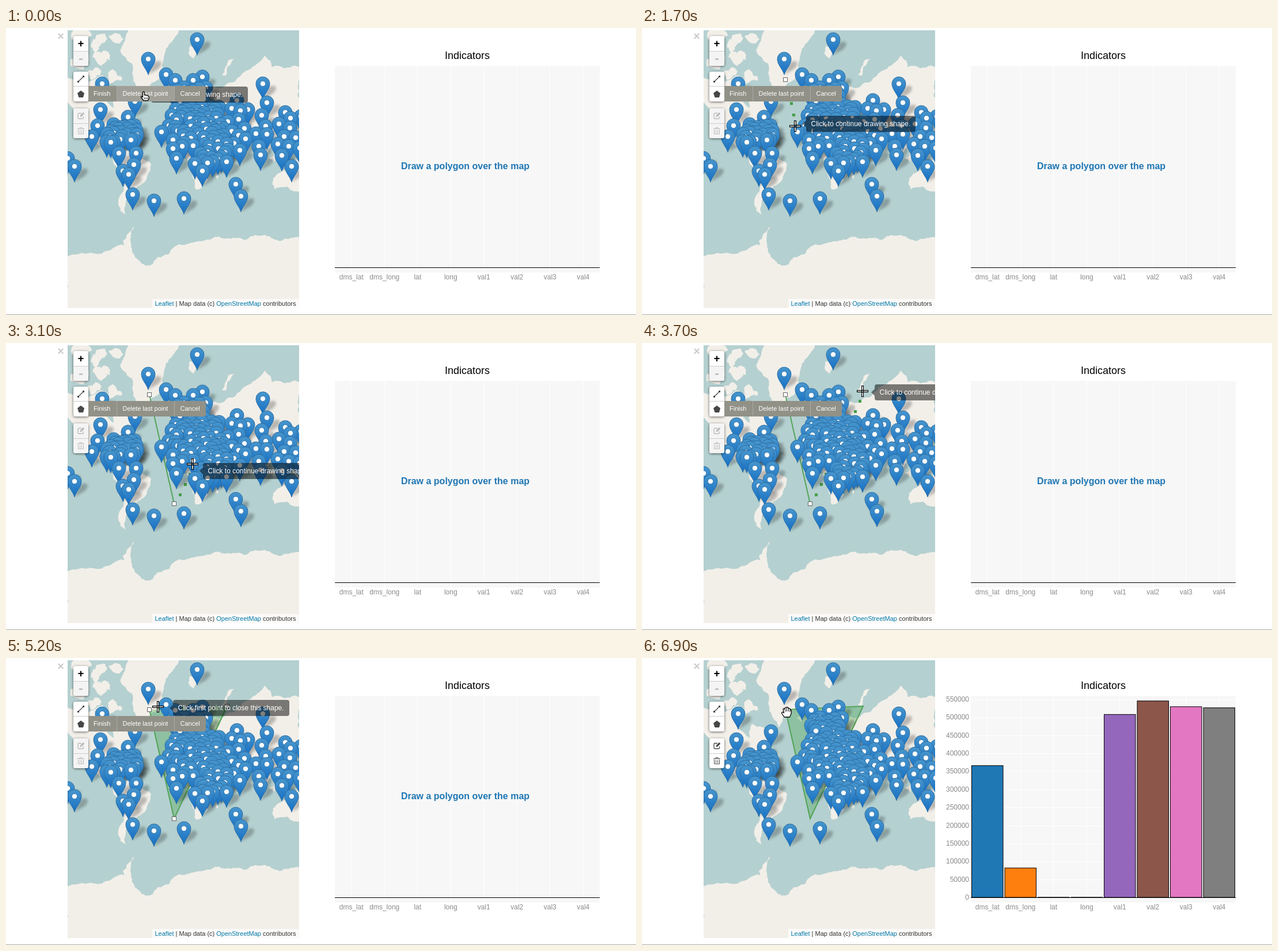
An HTML page that plays this animation: 1094x500 px, repeating every 8 s.

```html
<!DOCTYPE html>
<html lang="en">
<head>
<meta charset="utf-8">
<title>Map indicators</title>
<style>
  html, body { margin: 0; width: 100%; height: 100%; overflow: hidden; background: #fff; }
  svg { display: block; width: 1094px; height: 500px; }
  text { font-family: "Liberation Sans", Arial, Helvetica, sans-serif; white-space: pre; }
</style>
</head>
<body>
<svg viewBox="0 0 1094 500">
  <defs>
    <clipPath id="mapClip"><rect x="107" y="4" width="402" height="484"/></clipPath>
    <linearGradient id="pinFill" x1="0" y1="0" x2="0" y2="1">
      <stop offset="0" stop-color="#4896cd"/><stop offset="1" stop-color="#156fc4"/>
    </linearGradient>
    <filter id="blur" x="-20%" y="-20%" width="140%" height="140%"><feGaussianBlur stdDeviation="2.2"/></filter>
    <filter id="drop" x="-40%" y="-40%" width="180%" height="180%">
      <feDropShadow dx="0" dy="1" stdDeviation="2.2" flood-opacity=".6"/>
    </filter>
    <g id="pin">
      <path d="M0 27.3C-2.5 18-12 10-12 0A12 12 0 0 1 12 0C12 10 2.5 18 0 27.3Z" fill="url(#pinFill)" stroke="#2c6ea3"/>
      <circle r="4.6" fill="#fff" stroke="#3577ab" stroke-width=".8"/>
    </g>
    <path id="shade" d="M0 27L8 9Q15 1 22 5Q25 11 16 18Z" fill-opacity=".24"/>
    <g id="cross" stroke-linecap="square">
      <path d="M-8 0H-3M3 0H8M0-8V-3M0 3V8" stroke="#000" stroke-width="4"/>
      <path d="M-8 0H-3M3 0H8M0-8V-3M0 3V8" stroke="#fff" stroke-width="1.7"/>
    </g>
    <g id="point" fill="#fff" stroke="#000" stroke-width="1.3" stroke-linejoin="round">
      <path d="M-1.5 7V-1Q0-3.5 1.5-1V4Q3 3 4 4.5Q6 3.5 6.500 5Q9 4.500 9 7V10L7.500 13.500H0L-4.500 7.500Q-4.500 5-1.500 7.500Z"/>
      <path d="M1.500 8v3M4 8v3M6.400 8v3" fill="none" stroke-width=".9"/>
    </g>
    <g id="grab" fill="#fff" stroke="#000" stroke-width="1.3" stroke-linejoin="round">
      <path d="M-4 9L-8.500 2Q-8.500-1-4.500 1.500L-6-4.500Q-5-7.500-3-5Q-2.500-9.500 0-7.500Q2.500-9.500 3.500-6Q6-7 6.500-4Q8.500-4 8.500-1Q8.500 4 5.500 9Z"/>
      <path d="M-3-5l1.500 4.500M.3-7.500l.4 6.500M3.500-6v5M6.500-4l-.6 4" fill="none" stroke-width="1"/>
    </g>
  </defs>
  <g clip-path="url(#mapClip)">
    <rect x="107" y="4" width="402" height="484" fill="#b5d0d0"/>
    <path id="land" fill="#f2efe9"/>
    <g id="shape"></g>
    <g id="pins"></g>
    <g id="over"></g>
  </g>
  <g id="credit"></g>
  <g id="controls"></g>
  <g id="chart"></g>
  <g id="cursor"></g>
</svg>
<script>
const LOOP = 8000, STEP = 100, DONE = 6400;
const $ = id => document.getElementById(id);
const rect = (x, y, w, h, fill, more = '') => `<rect x="${x}" y="${y}" width="${w}" height="${h}" fill="${fill}" ${more}/>`;
const path = (d, more) => `<path d="${d}" ${more}/>`;
const text = (x, y, size, fill, s, more = '') => `<text x="${x}" y="${y}" font-size="${size}" fill="${fill}" ${more}>${s}</text>`;
const use = (id, x, y) => `<use href="#${id}" x="${x}" y="${y}"/>`;
const clamp = v => Math.max(0, Math.min(1, v));
const ease = p => p < .5 ? 4 * p ** 3 : 1 - 4 * (1 - p) ** 3;
const pairs = s => s.trim().split(/\s+/).map(p => p.split(',').map(Number));
const gap = (a, b) => Math.hypot(a[0] - b[0], a[1] - b[1]);

function random(seed) {
  return () => {
    seed = (seed + 0x6D2B79F5) | 0;
    let r = Math.imul(seed ^ (seed >>> 15), 1 | seed);
    r = (r + Math.imul(r ^ (r >>> 7), 61 | r)) ^ r;
    return ((r ^ (r >>> 14)) >>> 0) / 4294967296;
  };
}
const rnd = random(11);
const between = (a, b) => a + (b - a) * rnd();

// A few longitude,latitude corners per land mass; the coast between them is fractal
const lands = [
  `-145,70 -115,68 -95,71 -82,68 -94,59 -80,52 -78,62 -64,60 -56,52 -70,43 -81,31 -81,25 -84,30 -97,27 -96,19 -88,21
   -83,10 -77,8 -95,15 -110,24 -124,40 -124,48 -145,60`,
  '-77,8 -62,10.5 -35,-6 -40,-21 -57,-37 -66,-46 -66,-56 -72,-54 -75,-49 -70,-18 -81,-5',
  '-44,60 -53,66 -58,75 -72,78.3 -60,83 0,83 -8,81 -20,76 -25,69.5 -40,65',
  '-6,35.5 11,35 32,31 43,12 51,12 40,-4 35,-22 26,-34 19,-34.5 9,3 -8,4.5 -17,15',
  `-9,43 -8,37 18,40 36,36 43,13 59,22 51,28 73,20 77,8 90,22 103,1 109,12 122,30 129,38 150,55 150,74 113,74 104,77.5
   80,72.5 68,68.5 40,66 22,70.5 5,61 12,56 22,64 21,55 4,52`,
  '114,-23 131,-12 143,-12 160,-24 150,-38 131,-32 116,-35',
  '52,71 57,71 58,74 68,76.8 59,76', '11,78 17,76.6 27,80 12,79.7', '-24,65.5 -18,63.4 -14,65', '-5,50 1,52 -5,58.5',
  '49,-12 47,-25 44,-22', '109,1 118,6 115,-4', '95,5 105,-6 104,-2', '131,-1 150,-5 150,-10'
];
const ice = `107,398 140,393 190,381 205,378 203,371 222,346 216,366 220,392 243,414 254,412 263,400 300,377 385,366
  440,362 509,364 530,600 80,600`;

const project = ([lon, lat]) =>
  [301.5 + lon * 512 / 360, 228 - 81.5 * Math.log(Math.tan(Math.PI / 4 + lat * Math.PI / 360))];
function roughEdge(a, b) {
  const dx = b[0] - a[0], dy = b[1] - a[1];
  if (Math.hypot(dx, dy) < 3) return [a];
  const k = between(-.13, .13);
  const mid = [(a[0] + b[0]) / 2 - dy * k, (a[1] + b[1]) / 2 + dx * k];
  return [...roughEdge(a, mid), ...roughEdge(mid, b)];
}
const outline = pts => 'M' + pts.flatMap((p, i) => roughEdge(p, pts[(i + 1) % pts.length]))
  .map(p => p.map(v => v.toFixed(1))).join('L') + 'Z';
function arcticIsland() {
  const x = between(112, 205), y = between(8, 88), r = between(6, 14);
  return Array.from({ length: 7 }, (_, i) => {
    const a = i * 2 * Math.PI / 7, k = r * between(.5, 1.2);
    return [x + k * Math.cos(a), y + k * Math.sin(a)];
  });
}
const shores = [...lands.map(s => pairs(s).map(project)), pairs(ice), ...Array.from({ length: 17 }, arcticIsland)];
$('land').innerHTML = '';
$('land').setAttribute('d', shores.map(outline).join(''));

// Lone pins by place; crowds scattered in boxes: x0, x1, y0, y1, tries, spacing
const lone = pairs(`332,20 247,54 278,81 167,97 224,128 164,142 212,155 159,170 149,189 107,227 119,241 196,218 226,218
  222,238 203,249 213,255 220,290 257,301 309,297 399,272 408,293 296,227 270,181 290,195 325,205 328,236 341,249 341,85
  294,91 325,91 446,97 401,126 453,130 485,147 404,159 414,175 453,185 406,213 442,221 479,222 496,241`);
const crowds = [
  [174, 228, 168, 200, 60, 5], [294, 350, 103, 132, 60, 6], [288, 370, 136, 162, 70, 7], [282, 384, 164, 210, 160, 7],
  [336, 386, 212, 237, 40, 7], [384, 420, 138, 205, 30, 13], [430, 512, 148, 212, 60, 14]
];
const pins = [...lone];
for (const [x0, x1, y0, y1, tries, space] of crowds)
  for (let i = 0; i < tries; i++) {
    const p = [Math.round(between(x0, x1)), Math.round(between(y0, y1))];
    if (pins.every((q, j) => gap(p, q) > (j < lone.length ? 13 : space))) pins.push(p);
  }
pins.sort((a, b) => a[1] - b[1]);
$('pins').innerHTML = `<g filter="url(#blur)">${pins.map(p => use('shade', ...p)).join('')}</g>` +
  pins.map(p => use('pin', ...p)).join('');

$('credit').innerHTML = rect(254, 472, 255, 16, '#fff', 'fill-opacity=".7"') +
  text(258.5, 484, 11, '#333', '<tspan fill="#0078a8">Leaflet</tspan> | Map data (c) <tspan fill="#0078a8">OpenStreetMap</tspan> contributors') +
  text(95, 21, 20, '#ccc', '×', 'text-anchor="middle" font-weight="bold"') + rect(0, 499, 1094, 1, '#aaa');

// Pointer time, x, y; the tooltip trails it slightly
const LAG = 30;
const track = [
  [-LAG, 231, 113], [0, 239, 113], [750, 248, 90], [1400, 248, 90], [2100, 290, 279], [2200, 290, 279], [2400, 292, 280],
  [2800, 292, 280], [3650, 383, 84], [4500, 383, 84], [5200, 264, 85], [5400, 252, 87], [5650, 249, 90]
];
const corners = [[1300, 249, 90], [2700, 292, 280], [4400, 384, 84]];
const tips = [
  ['Click to start drawing shape.', 168], ['Click to continue drawing shape.', 190],
  ['Click to continue drawing shape.', 190], ['Click first point to close this shape.', 202]
];

function pose(t) {
  const i = track.findIndex(k => k[0] > t);
  if (i < 0) return track.at(-1).slice(1);
  const a = track[i - 1], b = track[i], p = (t - a[0]) / (b[0] - a[0]);
  return [1, 2].map(j => Math.round(a[j] + (b[j] - a[j]) * p));
}

function drawShape(placed, x, y, done) {
  const line = 'M' + placed.map(c => c.slice(1)).join('L') + (done ? 'Z' : '');
  const fill = placed.length > 2 ? 'fill="#46a04a" fill-opacity=".35"' : 'fill="none"';
  let out = placed.length > 1 ? path(line, `${fill} stroke="#45a049" stroke-width="2" stroke-opacity=".88"`) : '';
  if (placed.length && !done) {
    const [, ax, ay] = placed.at(-1), len = Math.hypot(x - ax, y - ay);
    for (let d = 20; d < len; d += 20)
      out += rect(Math.round(ax + (x - ax) * d / len), Math.round(ay + (y - ay) * d / len), 5, 5, '#45a049');
  }
  return out;
}

function drawTip([label, w], t) {
  const [px, py] = pose(t - LAG), x = px + 21, y = Math.round(py * 1.02 - 13.7);
  return rect(x, y, w, 28, '#000', 'rx="4" fill-opacity=".5"') +
    path(`M${x} ${y + 8}l-6 6l6 6Z`, 'fill-opacity=".5"') + text(x + 8.5, y + 18, 12, '#fff', label);
}

const panel = y => rect(117, y, 26, 52, '#fff', 'rx="4" filter="url(#drop)"');
const divider = y => rect(117, y, 26, 1, '#ccc');
function drawControls(done, hover) {
  const ink = done ? '#464646' : '#b9b9b9';
  let out = panel(14) + rect(117, 41, 26, 25, '#f4f4f4', 'rx="4"') + divider(40) +
    text(130, 33, 18, '#000', '+', 'text-anchor="middle" font-weight="bold"') + rect(127, 53, 6, 2.5, '#bbb') +
    panel(76) + divider(101) + path('M125.5 93.5L134.5 84.5', 'stroke="#464646" stroke-width="1.2"') +
    rect(124, 92, 3, 3, '#464646') + rect(133, 83, 3, 3, '#464646') +
    path('M130 109L136 113.5L134 121H126.5L124 113.5Z', 'fill="#464646"') + panel(140);
  if (!done) out += rect(117, 140, 26, 52, '#f4f4f4', 'rx="4"');
  out += divider(166) +
    path('M131 148.5H126.5Q125 148.5 125 150V156.5Q125 158 126.5 158H133Q134.5 158 134.5 156.5V154', `fill="none" stroke="${ink}" stroke-width="1.3"`) +
    path('M128.5 155L129 152L134 147L136.3 149.3L131.3 154.3Z', `fill="${ink}"`) +
    path('M125.5 177V184.5H134.5V177M124 175.5H136M128 175V173.5H132V175M128.5 178V183M131.5 178V183', `fill="none" stroke="${ink}"`);
  if (done) return out;
  const bar = path('M143 101H343Q347 101 347 105V124Q347 128 343 128H143Z', 'fill="#919187"');
  return out + bar + (hover ? rect(193, 101, 99, 27, '#a0a098') : '') +
    rect(192, 101, 1, 27, '#aaa') + rect(292, 101, 1, 27, '#aaa') +
    text(152, 118, 11, '#fff', 'Finish') + text(202.5, 118, 11, '#fff', 'Delete last point') + text(302.5, 118, 11, '#fff', 'Cancel');
}

const bars = [
  ['dms_lat', 366000, '#1f77b4'], ['dms_long', 81500, '#ff7f0e'], ['lat', 300, '#2ca02c'], ['long', 300, '#d62728'],
  ['val1', 508000, '#9467bd'], ['val2', 545500, '#8c564b'], ['val3', 529500, '#e377c2'], ['val4', 526500, '#7f7f7f']
];
const BAND = 57.5, LEFT = 571, BASE = 417, SCALE = 345 / 550000;
function drawChart(t) {
  const age = t - DONE;
  let out = text(801, 54, 18, '#000', 'Indicators', 'text-anchor="middle"') + rect(LEFT, 66, 460, 360, '#f7f7f7');
  bars.forEach(([name], i) => {
    const mid = LEFT + BAND * (i + .5);
    out += rect(Math.floor(mid), 66, 1, 360, '#fff') + text(mid, 438, 12, '#8a8a8a', name, 'text-anchor="middle"');
  });
  if (age < 0)
    return out + text(797.5, 246, 16, '#1f77b4', 'Draw a polygon over the map', 'text-anchor="middle" font-weight="bold"') +
      rect(LEFT, BASE, 460, 1, '#000');
  let axis = '';
  for (let v = 0; v <= 550000; v += 50000) {
    const y = BASE - v * SCALE;
    axis += rect(LEFT, Math.round(y), 460, 1, '#fff') + text(568, y + 4, 12, '#8a8a8a', v, 'text-anchor="end"');
  }
  out += `<g opacity="${clamp(age / 250)}">${axis}</g>` + rect(LEFT, BASE, 460, 1, '#000');
  bars.forEach(([, value, fill], i) => {
    const h = value * SCALE * ease(clamp((age - i * 31) / 250));
    out += rect(LEFT + BAND * i + 1.5, BASE - h, 54.5, Math.max(h, .01), fill, 'stroke="#000"');
  });
  return out;
}

function draw(t) {
  const [x, y] = pose(t), done = t >= DONE;
  const placed = corners.filter(c => t >= c[0]);
  const onBar = !done && y >= 101 && y < 128 && x < 347;
  const onCorner = placed.some(c => gap([x, y], c.slice(1)) < 4.5);
  $('shape').innerHTML = drawShape(placed, x, y, done);
  $('over').innerHTML = done ? '' :
    placed.map(c => rect(c[1] - 3.5, c[2] - 3.5, 7, 7, '#fff', 'stroke="#666"')).join('') + drawTip(tips[placed.length], t);
  $('controls').innerHTML = drawControls(done, onBar && x >= 193 && x < 292);
  $('chart').innerHTML = drawChart(t);
  $('cursor').innerHTML = done ? use('grab', x + 2, y + 4) : use(onBar || onCorner ? 'point' : 'cross', x, y);
}

let shown = -1;
function tick() {
  const t = Math.floor(performance.now() % LOOP / STEP) * STEP;
  if (t !== shown) draw(shown = t);
  requestAnimationFrame(tick);
}
tick();
</script>
</body>
</html>
```
